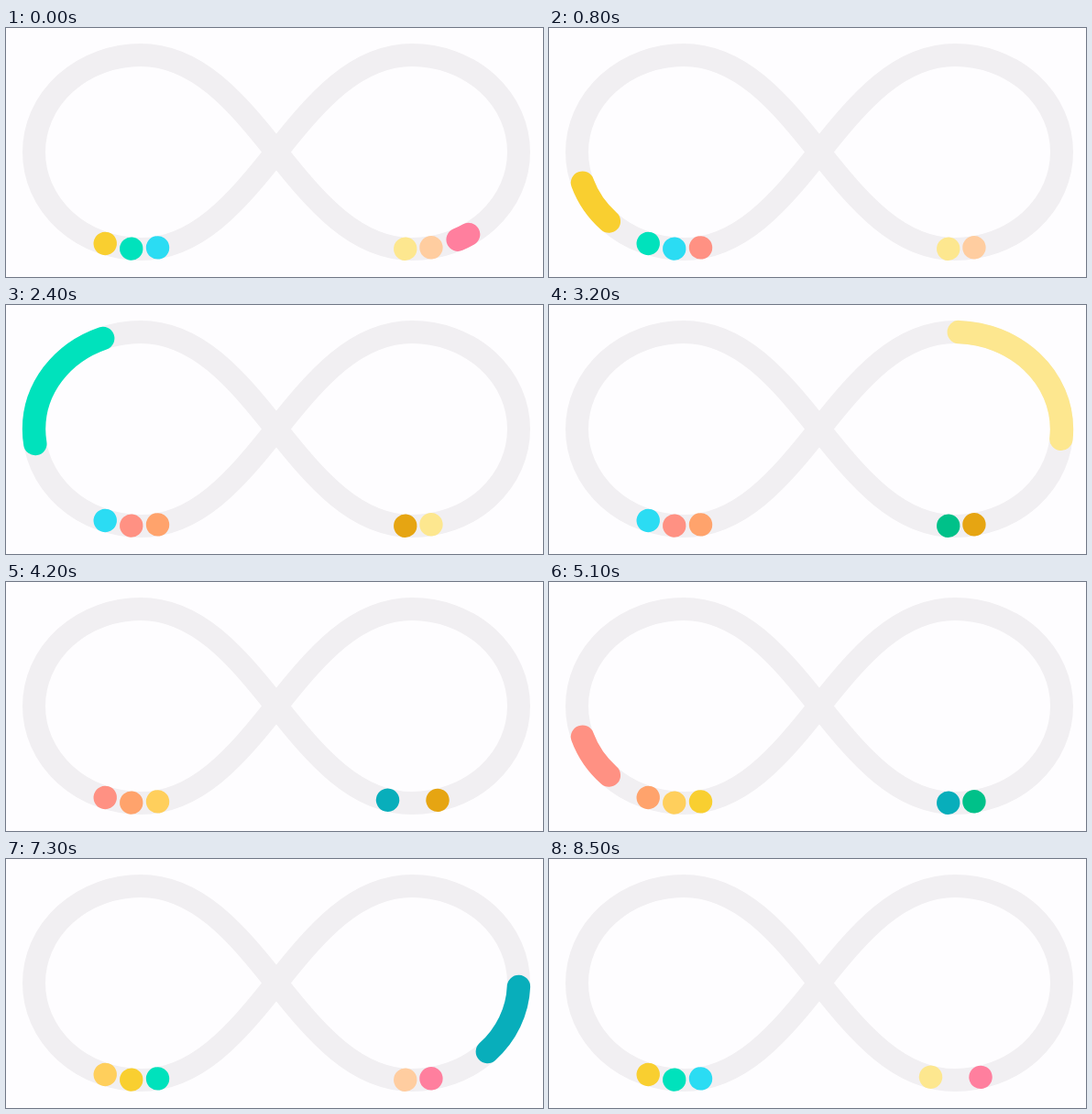
Recreate the animation shown at these times as an HTML page. Size 586 by 272 pixels, loop 8600 ms.

```html
<!DOCTYPE html>
<html lang="en">
<head>
<meta charset="utf-8">
<title>Infinity loader</title>
<style>
  html, body { margin: 0; width: 100%; height: 100%; overflow: hidden; background: #fefdff; }
  svg { display: block; }
  path { fill: none; }
  .ball { stroke-width: 25.4; stroke-linecap: round; }
</style>
</head>
<body>
<svg id="stage" width="586" height="272" viewBox="0 0 586 272">
  <path id="track" stroke="#f1eff2" stroke-width="25" d="M443 241.5
    A116.5 106 0 0 0 559.5 135.5 A116.5 106 0 0 0 443 29.5
    C382 29.5 339 80 295 135.5 C251 191 208 241.5 147 241.5
    A116.5 106 0 0 1 30.5 135.5 A116.5 106 0 0 1 147 29.5
    C208 29.5 251 80 295 135.5 C339 191 382 241.5 443 241.5Z"/>
</svg>
<script>
const LOOP = 8600, STEP = 100, COUNT = 6;
const TICK = 1000 / 30, CYCLE = 43, BEAT = CYCLE / 2, SPAN = CYCLE * COUNT;

// Distances along the track, measured from the lowest point of each lobe
const RIGHT_SLOT = -8, LEFT_SLOT = -19, GAP = 29, CONTACT = 26;

const stage = document.getElementById('stage');
const track = document.getElementById('track');
const total = track.getTotalLength(), half = total / 2;

// Colour on the right side, colour on the left side
const colors = [
  [[255, 127, 158], [255, 145, 131]],
  [[255, 205, 160], [255, 163, 108]],
  [[253, 231, 143], [255, 207, 92]],
  [[230, 165, 18], [249, 207, 48]],
  [[0, 193, 137], [0, 226, 188]],
  [[8, 174, 187], [43, 220, 243]]
];

// Each end of a ball climbs this far, then waits for the drop
const head = { climb: 308, start: -1.9, span: 13.7 };
const tail = { climb: 118, start: -0.9, span: 12.4 };

const clamp = x => Math.max(0, Math.min(1, x));
const sine = x => (1 - Math.cos(Math.PI * clamp(x))) / 2;
const push = v => clamp((v + 4) / 4);

function trip(v, length, { climb, start, span }) {
  const drop = clamp((v - 11) / 6.5) ** 1.5;
  return climb * sine((v - start) / span) + (length - climb) * drop;
}

// Beats 0 and 7 send the ball off, 1 and 8 are its arrivals, the rest move it up the row
function place(u, end) {
  const toLeft = half + LEFT_SLOT - CONTACT - (RIGHT_SLOT + 2 * GAP);
  const toRight = half + RIGHT_SLOT - CONTACT - (LEFT_SLOT + 3 * GAP);
  let s = RIGHT_SLOT + GAP;
  for (const beat of [0, 3, 5, 7, 10]) s += GAP * push(u - beat * BEAT);
  for (const beat of [1, 8]) s += CONTACT * push(u - beat * BEAT);
  return s + trip(u, toLeft, end) + trip(u - 7 * BEAT, toRight, end);
}

function mix([a, b], k) {
  return `rgb(${a.map((v, i) => Math.round(v + (b[i] - v) * k))})`;
}

const balls = colors.map(() => {
  const ball = track.cloneNode();
  ball.removeAttribute('id');
  ball.removeAttribute('stroke-width');
  ball.setAttribute('class', 'ball');
  return stage.appendChild(ball);
});

function draw(ms) {
  const t = Math.floor(ms % LOOP / STEP) * STEP;
  balls.forEach((ball, i) => {
    const u = (t / TICK - CYCLE * i + 4 + SPAN) % SPAN - 4;
    const from = place(u, tail);
    const len = Math.max(0.01, place(u, head) - from);
    const tint = clamp((u - 12) / 5) - clamp((u - 7 * BEAT - 12) / 5);
    ball.setAttribute('stroke-dasharray', `${len} ${total - len}`);
    ball.setAttribute('stroke-dashoffset', -(from % total));
    ball.setAttribute('stroke', mix(colors[i], tint));
  });
}

const begin = performance.now();
function frame() {
  draw(performance.now() - begin);
  requestAnimationFrame(frame);
}
draw(0);
requestAnimationFrame(frame);
</script>
</body>
</html>
```
